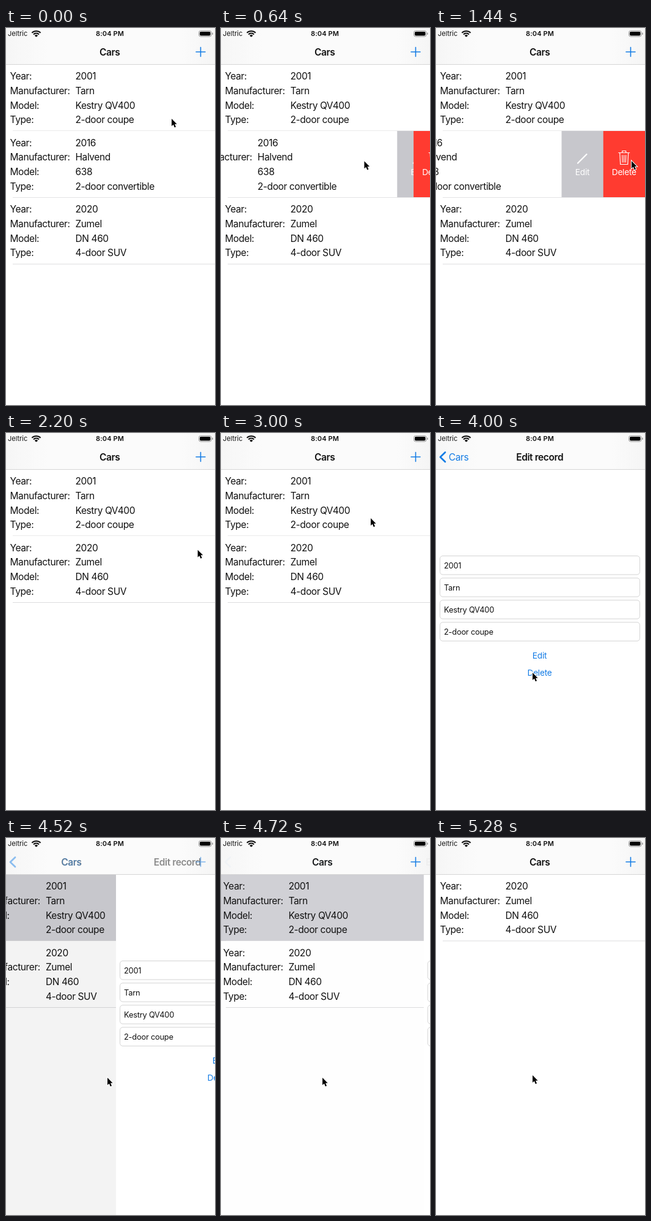
Animation of 342x615 px, one loop 5400 ms. Source, as an HTML page with a canvas:

```html
<!DOCTYPE html>
<html lang="en">
<head>
<meta charset="utf-8">
<title>Cars</title>
<style>
html, body { margin: 0; width: 100%; height: 100%; overflow: hidden; background: #fff; }
canvas { display: block; }
</style>
</head>
<body>
<canvas id="stage" width="342" height="615"></canvas>
<script>
const W = 342, H = 615, LOOP = 5400, STEP = 40;
const NAV = 59, ROW = 108.6, OPEN = 136.5;
const BLUE = '#147ce5', INK = '#111';
const ctx = document.getElementById('stage').getContext('2d');

const labels = ['Year:', 'Manufacturer:', 'Model:', 'Type:'];
const cars = [
  ['2001', 'Tarn', 'Kestry QV400', '2-door coupe'],
  ['2016', 'Halvend', '638', '2-door convertible'],
  ['2020', 'Zumel', 'DN 460', '4-door SUV']
];

// Pointer stops: time, x, y
const pointer = [
  [0, 271, 148], [400, 288, 215], [960, 152, 221], [1060, 152, 221],
  [1440, 320, 217], [1960, 320, 217], [2520, 304, 150], [2760, 275, 130],
  [3000, 245, 139], [3120, 245, 139], [3320, 239, 149], [3660, 239, 149],
  [4000, 158, 391], [4240, 158, 391], [4480, 166, 391], [4760, 166, 391],
  [5280, 158, 387], [LOOP, 158, 387]
];

const lerp = (a, b, p) => a + (b - a) * p;
const ramp = (t, a, b) => Math.min(1, Math.max(0, (t - a) / (b - a)));
const ease = p => p * p * (3 - 2 * p);
const spring = ms => {
  const x = 0.018 * Math.max(0, ms);
  return 1 - (1 + x) * Math.exp(-x);
};

function text(str, x, y, size, { color = INK, weight = 400, align = 'left', track = 0, alpha = 1 } = {}) {
  ctx.save();
  ctx.globalAlpha *= alpha;
  ctx.font = `${weight} ${size}px Inter, Roboto, sans-serif`;
  ctx.letterSpacing = track + 'px';
  ctx.textAlign = align;
  ctx.fillStyle = color;
  ctx.fillText(str, x, y);
  ctx.restore();
}

function rect(x, y, w, h, color) {
  ctx.fillStyle = color;
  ctx.fillRect(x, y, w, h);
}

function line(d, color, width, x = 0, y = 0, alpha = 1) {
  ctx.save();
  ctx.translate(x, y);
  ctx.globalAlpha *= alpha;
  ctx.strokeStyle = color;
  ctx.lineWidth = width;
  ctx.lineCap = ctx.lineJoin = 'round';
  ctx.stroke(new Path2D(d));
  ctx.restore();
}

function pill(x, y, w, h, r, fill, stroke) {
  ctx.beginPath();
  ctx.roundRect(x, y, w, h, r);
  if (fill) { ctx.fillStyle = fill; ctx.fill(); }
  if (stroke) { ctx.strokeStyle = stroke; ctx.lineWidth = 1; ctx.stroke(); }
}

function actions(y, open) {
  const edit = W - open, del = W - open / 2;
  const caption = { color: '#fff', align: 'center', track: -0.25 };
  rect(edit, y, open, ROW - 0.6, '#c7c7cc');
  text('Edit', edit + 34, y + 71.5, 13.7, caption);
  line('M-6 7L-7.5 8.5M-5.5 6.5L7 -6', '#fff', 2.2, edit + 34, y + 44);
  rect(del, y, W - del, ROW - 0.6, '#ff3b30');
  text('Delete', del + 34, y + 71.5, 13.7, caption);
  line('M-9 -8H9M-3 -8V-11H3V-8M-7 -8L-6 11H6L7 -8M-3 -4L-2.6 7.5M0 -4V7.5M3 -4L2.6 7.5',
    '#fff', 1.2, del + 34, y + 43.5);
}

function row(car, y, scale, open, glow) {
  if (scale <= 0) return;
  ctx.save();
  ctx.beginPath();
  ctx.rect(0, y, W, ROW * scale + 1);
  ctx.clip();
  rect(0, y, W, ROW + 1, '#fff');
  if (glow) {
    ctx.globalAlpha = glow;
    rect(0, y, W, ROW, '#d1d1d6');
    ctx.globalAlpha = 1;
  }
  labels.forEach((label, i) => {
    const base = y + 24.8 + i * 23.65;
    text(label, 6.5 - open, base, 15.5, { track: -0.4 });
    text(car[i], 113.5 - open, base, 15.5, { track: -0.4 });
  });
  rect(11, y + ROW - 0.6, W, 1, '#dcdcde');
  if (open > 0) actions(y, open);
  ctx.restore();
}

function list(t, shown) {
  const heights = [1 - ease(ramp(t, 4960, 5260)), 1 - ramp(t, 1680, 1800), 1];
  const open = OPEN * ease(ramp(t, 400, 960));
  const glow = t < 3120 ? 0 : 1 - ramp(t, 4740, 4960);
  ctx.save();
  ctx.translate(-0.3 * W * shown, 0);
  let y = NAV + 0.4;
  cars.forEach((car, i) => {
    row(car, y, heights[i], i === 1 ? open : 0, i === 0 ? glow : 0);
    y += ROW * heights[i];
  });
  ctx.restore();
  rect(0, NAV, W, H, `rgba(0,0,0,${0.1 * shown})`);
}

function form(shown) {
  if (shown <= 0) return;
  ctx.save();
  ctx.translate(W * (1 - shown), 0);
  rect(0, NAV, W, H, '#fff');
  cars[0].forEach((value, i) => {
    const y = 200.5 + i * 36.1;
    pill(6.5, y, 327, 30.5, 4.5, '#fff', '#d4d4d4');
    text(value, 13, y + 20, 12.8, { track: -0.2 });
  });
  const button = { color: BLUE, align: 'center', track: -0.25 };
  text('Edit', 169.5, 368.3, 13.7, button);
  text('Delete', 169.5, 396.3, 13.7, button);
  ctx.restore();
}

function statusBar() {
  text('Jeltric', 3, 13.4, 11);
  text('8:04 PM', 170, 13.4, 11, { weight: 600, align: 'center', track: 0.1 });
  [[11, 2], [7.3, 2], [3.2, 3]].forEach(([r, width]) => {
    ctx.beginPath();
    ctx.arc(49.5, 15, r - 0.9, -Math.PI * 0.75, -Math.PI * 0.25);
    ctx.strokeStyle = INK;
    ctx.lineWidth = width;
    ctx.stroke();
  });
  pill(315.5, 4.5, 20.5, 9.5, 3, null, '#999');
  pill(317, 6, 17.5, 6.5, 1.8, '#000');
  pill(337.2, 7.5, 1.4, 3.6, 0.7, '#999');
}

function navBar(shown) {
  const shade = ctx.createLinearGradient(0, 0, W, 0);
  [[0, '#f6f6f6'], [0.2, '#fbfbfb'], [0.84, '#fbfbfb'], [1, '#f5f5f5']]
    .forEach(stop => shade.addColorStop(...stop));
  rect(0, 0, W, NAV, shade);
  rect(0, NAV, W, 1, '#d6d6d6');
  const title = { align: 'center', weight: 600, track: -0.4 };
  const carsX = lerp(169.7, 37, shown);
  text('Cars', carsX, 44.6, 15.5, { ...title, alpha: 1 - shown });
  text('Cars', carsX, 44.6, 15.5, { ...title, weight: 400, color: BLUE, alpha: shown });
  text('Edit record', 169.7 + 210 * (1 - shown), 44.6, 15.5, { ...title, alpha: shown });
  line('M15 31.5L7 39.2L15 47', BLUE, 2.7, 0, 0, shown);
  line('M-7.5 0H7.5M0 -7.5V7.5', BLUE, 1.6, 318.5, 39, 1 - shown);
  statusBar();
}

function cursor(t) {
  const i = pointer.findIndex(stop => stop[0] > t);
  const [a, b] = [pointer[i - 1], pointer[i]];
  const p = ease(ramp(t, a[0], b[0]));
  ctx.save();
  ctx.translate(lerp(a[1], b[1], p), lerp(a[2], b[2], p));
  const arrow = new Path2D('M0 0V12L2.8 9.5L4.8 14.2L7 13.2L5 8.7H8.6Z');
  ctx.strokeStyle = '#fff';
  ctx.lineWidth = 2;
  ctx.stroke(arrow);
  ctx.fillStyle = '#000';
  ctx.fill(arrow);
  ctx.restore();
}

function draw(now) {
  const t = Math.floor((now % LOOP) / STEP) * STEP;
  const shown = t < 4760 ? spring(t - 3120) - spring(t - 4422) : 1 - spring(t - 4422);
  const visible = shown < 0.002 ? 0 : shown;
  rect(0, 0, W, H, '#fff');
  list(t, visible);
  form(visible);
  navBar(visible);
  cursor(t);
  requestAnimationFrame(draw);
}

requestAnimationFrame(draw);
</script>
</body>
</html>
```
